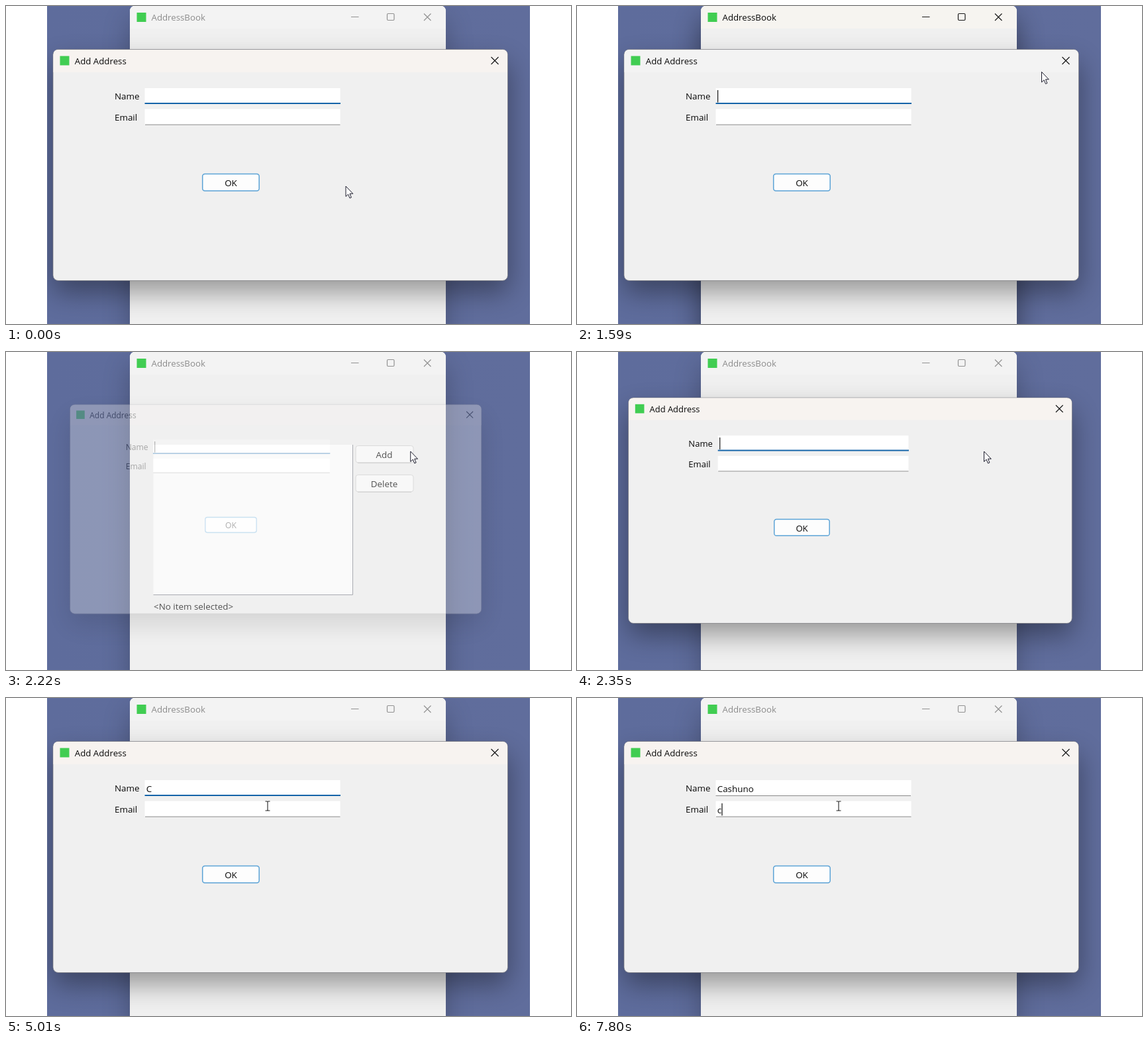
Write an HTML page that moves like this. It is 853 by 480 pixels and loops after 7990 ms.

```html
<!DOCTYPE html>
<html lang="en">
<head>
<meta charset="utf-8">
<title>Address book</title>
<style>
  html, body { margin: 0; width: 100%; height: 100%; overflow: hidden; background: #fff; }
  svg { display: block; width: 853px; height: 480px; }
  text { font: 13.4px "Open Sans", "Noto Sans", sans-serif; fill: #080808; }
  .title { font-size: 13.25px; }
  .mid { text-anchor: middle; }
  .glyph { fill: none; stroke: #1b1b1b; stroke-width: 1.2; }
  .button { fill: #fdfdfd; stroke: #d2d2d2; }
  .inactive text { fill: #8c8c8c; }
  .inactive .glyph { stroke: #929292; }
  .bar { fill: #f6f4f0; }
  .inactive .bar { fill: #f3f3f3; }
</style>
</head>
<body>
<svg viewBox="0 0 853 480">
  <defs>
    <clipPath id="desktop"><rect x="62" width="729" height="480"/></clipPath>
    <linearGradient id="wall" x1="0" x2="1">
      <stop offset="0" stop-color="#5e6c9c"/>
      <stop offset="1" stop-color="#606d9c"/>
    </linearGradient>
    <filter id="blur" x="-30%" y="-30%" width="160%" height="160%">
      <feGaussianBlur stdDeviation="21"/>
    </filter>
  </defs>

  <g clip-path="url(#desktop)">
    <rect x="62" width="729" height="480" fill="url(#wall)"/>
    <rect id="mainShadow" x="187" y="20" width="477" height="560" filter="url(#blur)"/>

    <g id="main">
      <rect x="187" y="-.5" width="477" height="500" rx="8" fill="#f0f0f0"/>
      <path class="bar" d="M187 34V8q0-8 8-8H656q8 0 8 8V34Z"/>
      <rect x="197.5" y="10" width="14" height="14" fill="#41cd52"/>
      <text class="title" x="219.5" y="22">AddressBook</text>
      <path class="glyph" d="M521 16.5h11.5M631 11.5l10.5 10.5m0-10.5l-10.5 10.5"/>
      <rect class="glyph" x="575.5" y="11.5" width="10.5" height="10" rx="1.5"/>
    </g>
    <g>
      <rect x="222.5" y="140" width="301" height="226.5" fill="#fff"/>
      <path d="M523.5 140V366.5H222.5" fill="none" stroke="#898b94"/>
      <rect class="button" x="528" y="141.5" width="87" height="25.5" rx="3.5"/>
      <rect class="button" x="528" y="185.5" width="87" height="25.5" rx="3.5"/>
      <path d="M531 167.3h81M531 211.3h81" stroke="#bdbdbd"/>
      <text class="mid" x="571" y="160">Add</text>
      <text class="mid" x="571" y="204">Delete</text>
      <text x="223" y="389">&lt;No item selected&gt;</text>
    </g>

    <g id="dialog">
      <rect x="71" y="86" width="687" height="346" rx="8" opacity=".38" filter="url(#blur)"/>
      <rect x="71" y="65.5" width="686.5" height="349" rx="8" fill="#f0f0f0" stroke="#77777c" stroke-opacity=".7"/>
      <path id="dialogBar" d="M71.5 100V73.5q0-7.5 7.5-7.5H749.5q7.5 0 7.5 7.5V100Z"/>
      <rect x="81.5" y="75.5" width="14" height="14" fill="#41cd52"/>
      <text class="title" x="103.8" y="88">Add Address</text>
      <path class="glyph" d="M732.5 77l11 11m0-11l-11 11"/>

      <text x="164" y="141">Name</text>
      <rect x="209.5" y="124" width="295" height="23.5" fill="#fff"/>
      <rect id="nameLine" x="209.5"/>
      <text id="name" x="211.7" y="142"/>

      <text x="164" y="173">Email</text>
      <rect x="209.5" y="155.5" width="295" height="24" fill="#fff"/>
      <rect x="210" y="178.7" width="294.5" height="1" fill="#8b8b8b"/>
      <text id="email" x="211.7" y="174"/>
      <rect id="caret" width="1.2" height="18.5" fill="#111"/>

      <rect x="296.7" y="253.5" width="85.5" height="25.5" rx="3.5" fill="#fdfdfd" stroke="#5ba3d6" stroke-width="1.5"/>
      <text class="mid" x="339.5" y="272">OK</text>
    </g>

    <path id="arrow" d="M0 0V15.5L3.6 12.2 6 18 8.4 17 6 11.3H10.8Z" fill="#fff" stroke="#1c1c2c"/>
    <path id="beam" d="M-3.5-7h2.5q1 0 1 1V6q0 1-1 1h-2.5M3.5-7H1q-1 0-1 1V6q0 1 1 1h2.5" fill="none" stroke="#222" stroke-width="1.1"/>
  </g>
</svg>

<script>
const LOOP = 7990, TICK = 190 / 3, START = 260;
const CLOSE = 1590, CLOSED = 1780, OPEN = 2180, OPENED = 2480;
const TAB = 6940, EMAIL = 7800;
const PERSON = "Cashuno";
const PIVOT = [340, 211];

// Each entry: time, then value(s)
const typed = [[0, 0], [3360, 1], [3490, 2], [3550, 3], [3680, 4], [3810, 5],
  [4060, 4], [4190, 3], [4250, 2], [4310, 1], [4440, 0], [4570, 1],
  [5520, 2], [5650, 3], [5770, 4], [5900, 5], [6230, 6], [6290, 7]];
const blinks = [[0, 0], [320, 1], [760, 0], [1270, 1], [2860, 0], [3300, 1],
  [5010, 0], [5390, 1], [6880, 0], [TAB, 1]];
const route = [[START, 513, 272], [1020, 737, 84], [1460, 737, 84], [CLOSE, 701.5, 99.5],
  [CLOSED, 605, 112.5], [1845, 600, 146], [1970, 600, 150], [2350, 614.5, 150], [2730, 395, 163]];

const el = id => document.getElementById(id);
const set = (id, attrs) => {
  for (const key in attrs) el(id).setAttribute(key, attrs[key]);
};
const clamp = v => Math.max(0, Math.min(1, v));
const valueAt = (list, t) => list.findLast(entry => entry[0] <= t)[1];

function pointerAt(t) {
  const next = route.findIndex(stop => stop[0] > t);
  if (next < 0) return route.at(-1).slice(1);
  if (next === 0) return route[0].slice(1);
  const [t0, ...from] = route[next - 1], [t1, ...to] = route[next];
  const p = (t - t0) / (t1 - t0), eased = p * p * (3 - 2 * p);
  return from.map((v, i) => v + (to[i] - v) * eased);
}

function dialogAt(t) {
  if (t < OPEN) {
    const p = clamp((t - CLOSE) / (CLOSED - CLOSE));
    return { scale: 1 - 0.1 * p * p, opacity: 1 - p };
  }
  const p = clamp((t - OPEN) / (OPENED - OPEN));
  return { scale: 1 - 0.13 * (1 - p) ** 2, opacity: clamp(p * 2.2) };
}

function drawFields(t) {
  const inEmail = t >= TAB;
  el("name").textContent = PERSON.slice(0, valueAt(typed, t));
  el("email").textContent = t >= EMAIL ? "c" : "";
  set("nameLine", inEmail
    ? { y: 147, width: 294.5, height: 1, fill: "#8b8b8b" }
    : { y: 146, width: 295.5, height: 2, fill: "#1464a8" });
  const width = el(inEmail ? "email" : "name").getComputedTextLength();
  set("caret", { x: 212 + width, y: inEmail ? 159 : 127, opacity: valueAt(blinks, t) });
}

function draw(time) {
  const t = time % LOOP;
  // Windows and pointer move at a fixed tick
  const step = START + Math.floor((t - START + 5) / TICK) * TICK;
  const active = step >= CLOSE - 5 && step < OPEN;
  const { scale, opacity } = dialogAt(step);
  const [x, y] = pointerAt(step);
  const overField = step > OPENED && x < 505;

  el("main").setAttribute("class", active ? "" : "inactive");
  set("mainShadow", { opacity: active ? 0.45 : 0.25 });
  set("dialogBar", { fill: active ? "#f3f3f3" : "#f7f3f0" });
  set("dialog", {
    opacity: opacity < 0.01 ? 0 : opacity,
    transform: `translate(${PIVOT}) scale(${scale}) translate(${PIVOT.map(v => -v)})`
  });
  set("arrow", { transform: `translate(${x} ${y})`, opacity: overField ? 0 : 1 });
  set("beam", { transform: `translate(${x} ${y})`, opacity: overField ? 1 : 0 });
  drawFields(t);
}

const began = performance.now();
function loop() {
  draw(performance.now() - began);
  requestAnimationFrame(loop);
}
loop();
</script>
</body>
</html>
```
